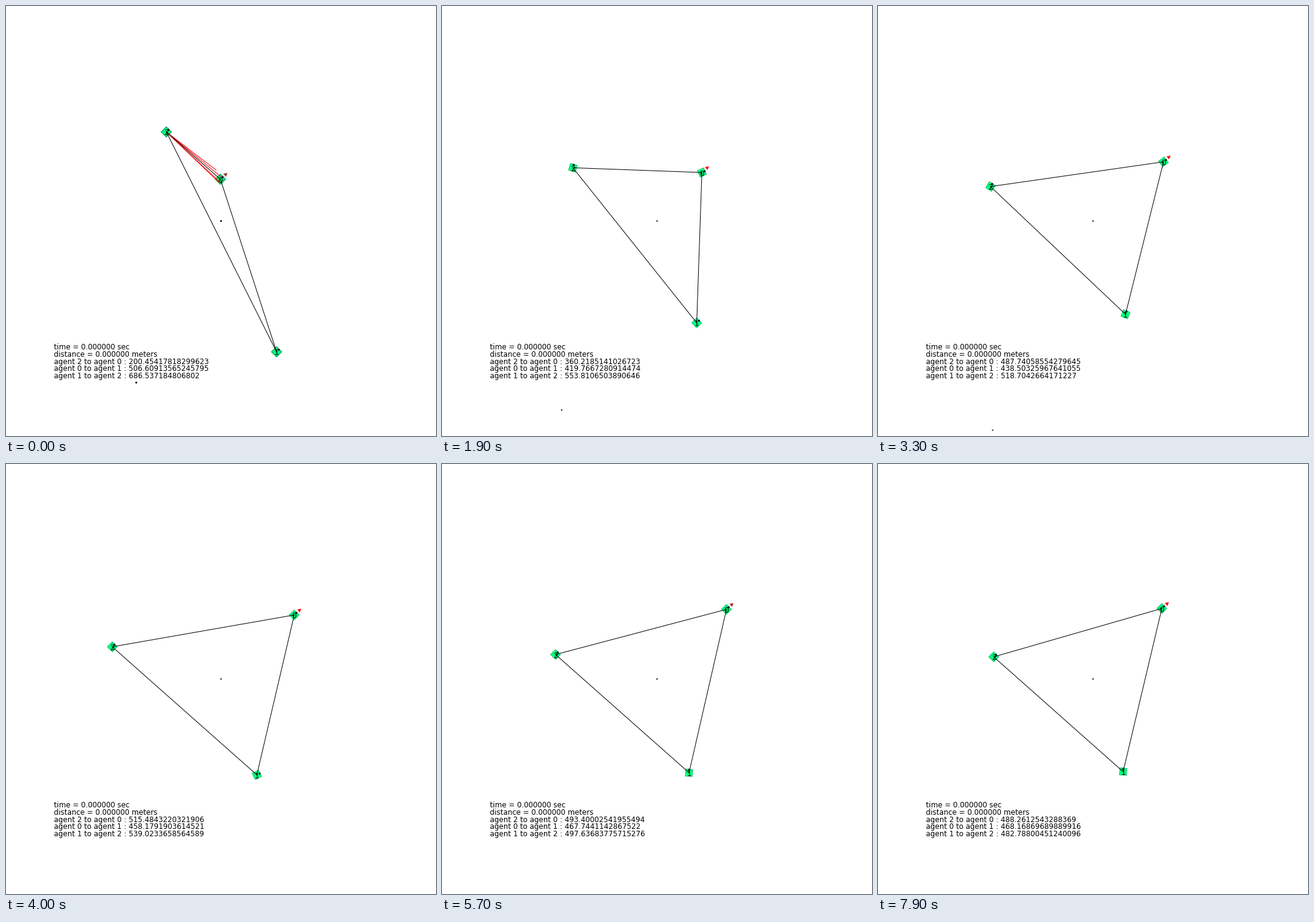
These frames come from a looping animation (700 px wide and 700 px high, 8 s). A matplotlib script:

```python
import numpy as np
import matplotlib.pyplot as plt
from matplotlib.animation import FuncAnimation
from matplotlib.patches import Circle, Polygon

SIZE, DPI, FRAMES, STEP = 700, 100, 80, 100
PT = 72 / DPI                 # points per pixel
WORLD = 1200 / SIZE           # world units per pixel
UNIT = 1 / WORLD
FONT = dict(family="DejaVu Sans", fontsize=11.72 * PT, color="black")
GATHER, TURN = 27, 38         # frames where the first two phases end
PAIRS = [(2, 0), (0, 1), (1, 2)]


class Agent:
    """Curves inwards, overshoots outwards, then settles exponentially."""

    def __init__(self, start, bend, meet, turn, rest, tau):
        points = np.array([start, bend, meet, turn, rest], float)
        self.start, self.bend, self.meet, self.turn, self.rest = points
        self.tau = tau

    def at(self, n):
        if n <= GATHER:
            u = n / GATHER
            return ((1 - u) ** 2 * self.start + 2 * u * (1 - u) * self.bend
                    + u * u * self.meet)
        if n <= TURN:
            u = (n - GATHER) / (TURN - GATHER)
            return self.meet + u * (self.turn - self.meet)
        return self.rest + (self.turn - self.rest) * np.exp((TURN - n) / self.tau)


agents = [
    Agent((349, 282), (398, 282), (457.3, 259.9), (471, 248.5), (462, 235), 9),
    Agent((440.5, 563), (432.6, 529.2), (395, 496.1), (409.5, 506.7), (397.5, 500), 20),
    Agent((261, 205), (220.3, 240.4), (198.5, 293), (170.3, 294.7), (189.2, 314.8), 13),
]


def headings(n):
    """Degrees: agents 0 and 2 lean once while gathering, agent 1 keeps swaying."""
    lean = np.sin(np.pi * min(n / TURN, 1))
    grow = min(n / GATHER, 1)
    sway = 13 + 34 * np.sin(2 * np.pi * (n - 21) / 27)
    return 45 - 20 * lean, 45 + grow * sway, 45 + 29 * lean


fig = plt.figure(figsize=(SIZE / DPI, SIZE / DPI), dpi=DPI, facecolor="white")
ax = fig.add_axes([0, 0, 1, 1])
ax.set(xlim=(0, SIZE), ylim=(SIZE, 0))
ax.axis("off")


def dot(x, y, radius, color="black"):
    return ax.add_patch(Circle((x, y), radius, color=color, lw=0, zorder=5))


def segment(color, z):
    line, = ax.plot([], [], color=color, lw=PT, zorder=z)
    line.set_snap(False)
    return line


def shape(z, **style):
    return ax.add_patch(Polygon(np.zeros((3, 2)), zorder=z, snap=False, **style))


def text_row(i, s=""):
    return ax.text(78, 559.4 + 20 * UNIT * i, s, va="baseline", **FONT)


bodies = [shape(2, fc="#00ff7f", ec="#14b066") for _ in agents]
noses = [dot(0, 0, 1.6, "#000030") for _ in agents]
labels = [ax.text(0, 0, str(i), ha="center", va="center_baseline", zorder=4, **FONT)
          for i in range(len(agents))]
links = [segment("black", 3) for _ in PAIRS]
RAY_ENDS = [(342, 267), (346.5, 287), (347.5, 286), (350, 278)]
rays = [segment("red", 2.5) for _ in RAY_ENDS]
arrow = shape(5, lw=0)
center = dot(350, 350, 1.1)
wanderer = dot(0, 0, 1.1)

text_row(0, "time = 0.000000 sec")
text_row(1, "distance = 0.000000 meters")
rows = [text_row(i + 2) for i in range(len(PAIRS))]

CORNERS = 10 * UNIT * np.array([(-1, -1), (1, -1), (1, 1), (-1, 1)])
ARROW = np.array([(4.9, -8.9), (11.5, -10.2), (9, -4)])


def draw(n):
    first = n == 0
    pos = [a.at(n) for a in agents]
    for p, deg, body, nose, label in zip(pos, headings(n), bodies, noses, labels):
        a = np.radians(deg)
        ahead = np.array([np.cos(a), -np.sin(a)])
        side = np.array([np.sin(a), np.cos(a)])
        body.set_xy(CORNERS @ np.array([ahead, side]) + p)
        body.set_linewidth((1.5 if first else 0.7) * PT)
        nose.center = tuple(p + 5 * ahead)
        label.set_position((p[0], p[1] + 0.5))

    for (a, b), link, row in zip(PAIRS, links, rows):
        link.set_data(*zip(pos[a], pos[b]))
        gap = float(np.hypot(*(pos[a] - pos[b])) * WORLD)
        row.set_text(f"agent {a} to agent {b} : {gap}")

    # The search rays show only before the agents set off.
    for ray, end in zip(rays, RAY_ENDS):
        ray.set_data(*zip(pos[2], end))
        ray.set_visible(first)

    arrow.set_xy(ARROW + pos[0])
    arrow.set_facecolor("red" if 2 <= n % 7 <= 5 else "brown")
    wanderer.center = 212 - 1.1 * n + 0.01 * n * n, 613 + 2.35 * n
    for d in (center, wanderer):
        d.set_radius(1.5 if first else 1.1)
    return []


anim = FuncAnimation(fig, draw, frames=FRAMES, interval=STEP, init_func=lambda: draw(0),
                     repeat=True, repeat_delay=0, blit=False)
plt.show()
```
